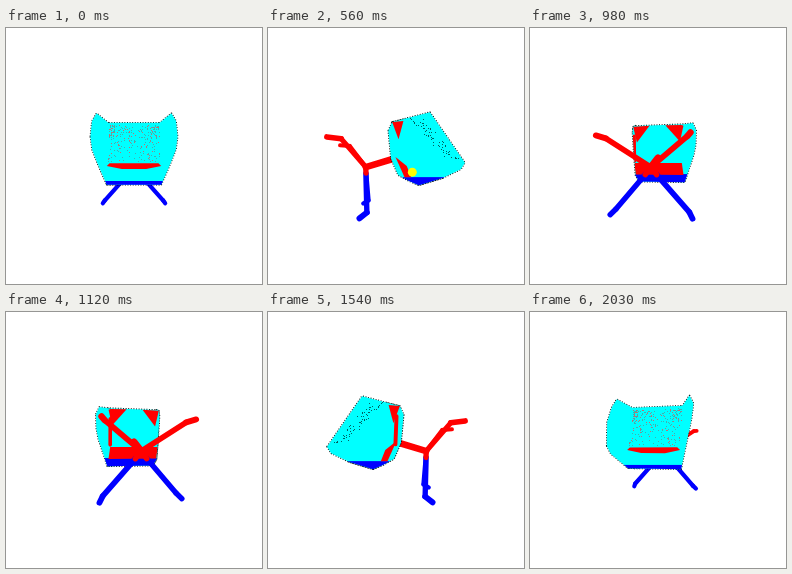
Animation of 256 by 256 pixels, one loop 2.1 s. Source, as an HTML page with a canvas:

```html
<!DOCTYPE html>
<html lang="en">
<head>
<meta charset="utf-8">
<title>Turning chair</title>
<style>
html, body { margin: 0; width: 100%; height: 100%; overflow: hidden; background: #fff; }
canvas { display: block; width: 256px; height: 256px; }
</style>
</head>
<body>
<canvas id="stage" width="256" height="256"></canvas>
<script>
const ctx = document.getElementById('stage').getContext('2d');
const STEP = 70, STEPS = 30, FOCAL = 220, CX = 128, CY = 138;
const CYAN = '#00ffff', RED = '#ff0000', BLUE = '#0000ff', YELLOW = '#ffff00';

// Right half of the shell; the left half is its mirror image. +z is the chair's front.
const WING = [33, -46.5, 26], SHOULDER = [36.5, -39, 29], SIDE = [35.5, -24, 41];
const ARM = [33, -13, 47], RIM = [27, -3, 60], RIM_LOW = [25, 3, 57];
const LIP = [20, 11, 42], BELLY = [10, 16, 28], UNDER = [25, 17.2, 18];
const BACK_LOW = [25, 10, 5], BACK_MID = [24, -8, -3], BACK_TOP = [24, -39, -6], DIP = [25, -42, 6];
const CORE = [LIP, BELLY, UNDER, BACK_LOW, BACK_MID, BACK_TOP, DIP];
const HALF = [WING, SHOULDER, SIDE, ARM, RIM, RIM_LOW, ...CORE];
const CORNER = [BACK_TOP, [25, -40, 4], [8, -40, -3], [22, -24, 0]];
const FLANK = [BACK_MID, BACK_LOW, [25, 10, 11], [25, 0, 7]];
const BAND = [[24, -3, -2], [25, 9, 5]];
const CUSHION = [[22, -2.4, 22], [24.5, 0, 22], [11, 2.8, 22]];
const HUB = [0, 1, -30], STEM_END = [0, -8, 0];
const UPPER_LEG = [HUB, [33, -22.5, -49], [36, -23.5, -60]];
const LOWER_LEG = [[5, 7.5, -29.7], [33, 39, -28], [36, 43, -34]];
const LOWER_ROOT = [HUB, LOWER_LEG[0]];

const mirror = pts => pts.map(([x, y, z]) => [-x, y, z]);
const both = pts => [...pts, ...mirror(pts)];
const onSide = (pts, side) => side > 0 ? pts : mirror(pts);

let seed = 7;
function random() {
  seed = (seed * 16807) % 2147483647;
  return seed / 2147483647;
}

// Grain on the inner back: denser at the upper corners and sides.
const grain = [];
while (grain.length < 260) {
  const u = random() * 2 - 1, v = random();
  const density = 0.08 + 0.8 * u ** 2 * (v < 0.32 ? 1 : 0.3);
  if (random() < density) {
    grain.push({ p: [u * 24, -40 + v * 36, 6 + v * 14], color: random() < 0.35 ? '#c07070' : '#40b0b0' });
  }
}
const sideGrain = Array.from({ length: 60 }, () => {
  const u = random(), v = random();
  return [32 + 2 * v, -41 + 35 * v, 20 + 32 * v - 12 * u];
});

let sin = 0, cos = 1;

function project([x, y, z]) {
  const depth = z * cos - x * sin;
  const s = FOCAL / (FOCAL - depth);
  return { x: CX + (x * cos + z * sin) * s, y: CY + y * s, s };
}

// Positive when a surface with this normal looks at the viewer.
const facing = (nx, nz) => nz * cos - nx * sin;

function hull(points) {
  const pts = points.map(project).sort((a, b) => a.x - b.x || a.y - b.y);
  const chain = list => {
    const out = [];
    for (const p of list) {
      while (out.length > 1) {
        const a = out[out.length - 2], b = out[out.length - 1];
        if ((b.x - a.x) * (p.y - a.y) - (b.y - a.y) * (p.x - a.x) > 0) break;
        out.pop();
      }
      out.push(p);
    }
    return out.slice(0, -1);
  };
  return [...chain(pts), ...chain(pts.slice().reverse())];
}

function hullPath(...groups) {
  const path = new Path2D();
  for (const group of groups) {
    hull(group).forEach((p, i) => i ? path.lineTo(p.x, p.y) : path.moveTo(p.x, p.y));
    path.closePath();
  }
  return path;
}

function fill(points, color) {
  ctx.fillStyle = color;
  ctx.fill(hullPath(points));
}

function rod(points, color, width) {
  ctx.strokeStyle = color;
  ctx.lineCap = ctx.lineJoin = 'round';
  const pts = points.map(project);
  for (let i = 1; i < pts.length; i++) {
    const a = pts[i - 1], b = pts[i];
    ctx.lineWidth = width * (a.s + b.s) / 2;
    ctx.beginPath();
    ctx.moveTo(a.x, a.y);
    ctx.lineTo(b.x, b.y);
    ctx.stroke();
  }
}

function speck(p, color) {
  const q = project(p);
  ctx.fillStyle = color;
  ctx.fillRect(Math.round(q.x), Math.round(q.y), 1, 1);
}

function drawBase() {
  for (const side of [-1, 1]) {
    rod(onSide(LOWER_LEG, side), BLUE, 4.8);
    rod(onSide(LOWER_ROOT, side), RED, 4.8);
  }
  rod([HUB, STEM_END], RED, 6.5);
  for (const side of [-1, 1]) rod(onSide(UPPER_LEG, side), RED, 4.6);
}

function drawBack() {
  if (cos < -0.15) fill(both(BAND), RED);
  for (const side of [-1, 1]) {
    if (facing(side, 0) > 0.3) fill(onSide(FLANK, side), RED);
    if (facing(side * 0.7, -0.7) > 0.1) {
      fill(onSide(CORNER, side), RED);
      if (side > 0) rod([[24, -30, -3], [24, -5, -2]], RED, 3.5);
    }
  }
  if (sin > 0.3) {
    const p = project([-25, 5.5, 12]);
    ctx.fillStyle = YELLOW;
    ctx.beginPath();
    ctx.ellipse(p.x, p.y, 1 + 3.5 * sin, 4.5, 0, 0, Math.PI * 2);
    ctx.fill();
  }
}

function drawSeat() {
  const shell = hullPath(HALF, mirror(HALF), both(CORE));
  ctx.strokeStyle = '#000';
  ctx.lineWidth = 1.6;
  ctx.lineCap = 'butt';
  ctx.setLineDash([1, 1.6]);
  ctx.stroke(shell);
  ctx.setLineDash([]);
  ctx.fillStyle = CYAN;
  ctx.fill(shell);

  ctx.save();
  ctx.clip(shell);
  ctx.fillStyle = BLUE;
  ctx.fillRect(0, 149.5 + 3.5 * cos, 256, 60);
  if (cos > 0.75) {
    for (const g of grain) speck(g.p, g.color);
    fill(both(CUSHION), RED);
  }
  for (const side of [-1, 1]) {
    if (facing(side, 0) > 0.85) for (const p of onSide(sideGrain, side)) speck(p, '#006060');
  }
  drawBack();
  ctx.restore();
}

function draw(time) {
  const angle = Math.floor(time / STEP) % STEPS / STEPS * Math.PI * 2;
  sin = Math.sin(angle);
  cos = Math.cos(angle);
  ctx.fillStyle = '#fff';
  ctx.fillRect(0, 0, 256, 256);
  const baseInFront = cos < -0.2;
  if (!baseInFront) drawBase();
  drawSeat();
  if (baseInFront) drawBase();
}

const start = performance.now();
function tick() {
  draw(performance.now() - start);
  requestAnimationFrame(tick);
}
tick();
</script>
</body>
</html>
```
